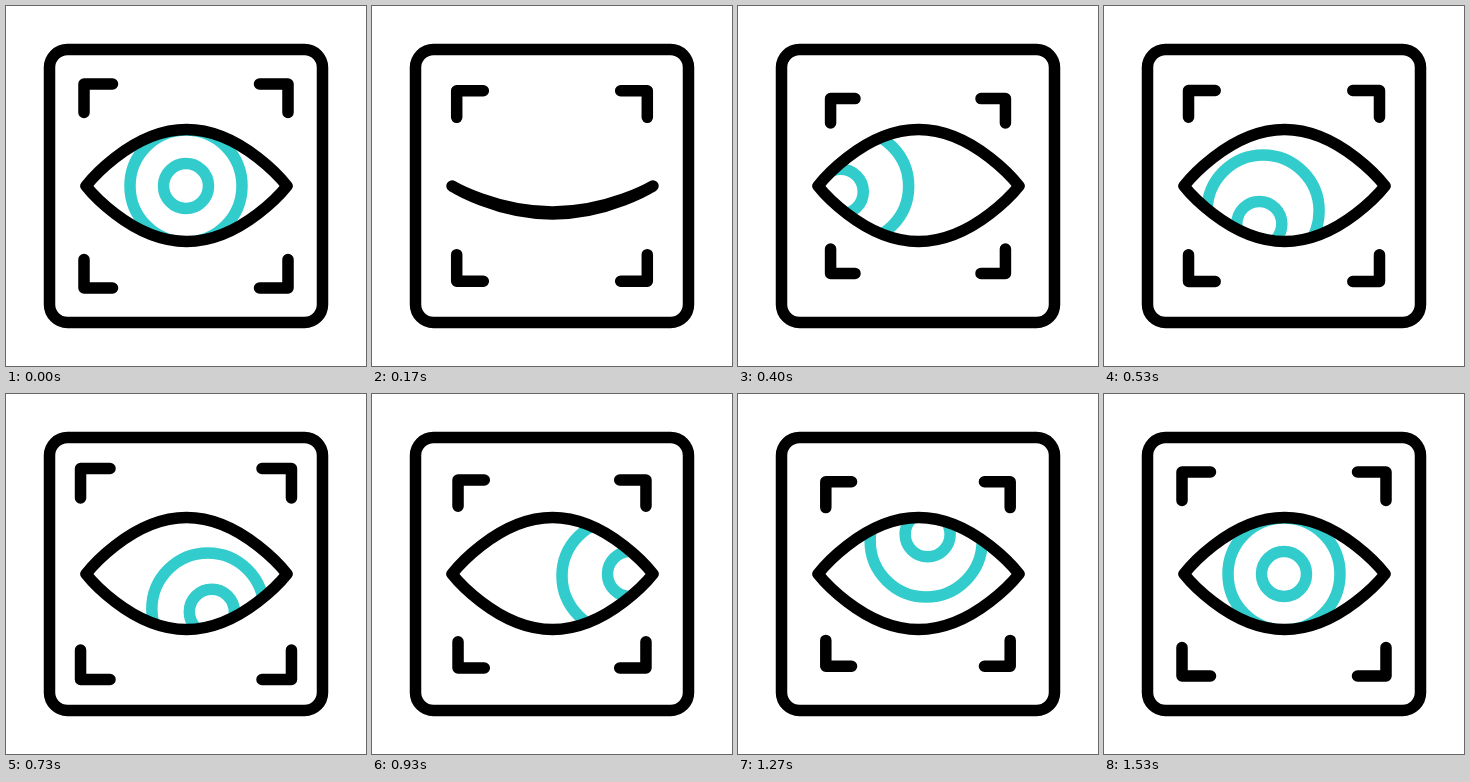
An HTML page for the animation above (1670 ms loop, 360x360 px).

```html
<!DOCTYPE html>
<html lang="en">
<head>
<meta charset="utf-8">
<title>Eye scan</title>
<style>
  html, body { margin: 0; width: 100%; height: 100%; overflow: hidden; background: #fff; }
  svg { display: block; width: 100%; height: 100%; }
</style>
</head>
<body>
<svg viewBox="0 0 360 360" fill="none" stroke="#000" stroke-width="11.5" stroke-linecap="round" stroke-linejoin="round">
  <clipPath id="opening"><path class="lids"/></clipPath>
  <rect x="43.5" y="43.5" width="273" height="273" rx="18"/>
  <path id="brackets" vector-effect="non-scaling-stroke"
    d="M-102-73.5V-102H-73.5M73.5-102H102V-73.5M102 73.5V102H73.5M-73.5 102H-102V73.5"/>
  <g clip-path="url(#opening)" stroke="#33cccc">
    <circle id="iris" r="56"/>
    <circle id="pupil" r="22.5"/>
  </g>
  <path class="lids"/>
</svg>
<script>
const LOOP = 1670, END = 1530, BLINK = 315;
const LEFT = 330, BOTTOM = 630, RIGHT = 930, TOP = 1370; // times the gaze gets there
const IRIS_LAG = 50;

const gazeAngle = [[LEFT, Math.PI], [BOTTOM, Math.PI / 2], [RIGHT, 0], [TOP, -Math.PI / 2]];
const bracketScale = [[0, 1], [360, .855], [720, 1.034], [1090, .855], [END, 1]];

const byId = id => document.getElementById(id);
const lids = document.querySelectorAll('.lids');
const clamp = u => Math.min(1, Math.max(0, u));
const ease = u => u ** 3 * (6 * u * u - 15 * u + 10);

// Eases through [time, value] keys and holds before the first and after the last
function tween(keys, t) {
  return keys.slice(1).reduce((value, [time, next], i) => {
    const [from, previous] = keys[i];
    return value + (next - previous) * ease(clamp((t - from) / (time - from)));
  }, keys[0][1]);
}

function place(id, x, y, scale = 1) {
  byId(id).setAttribute('transform', `translate(${180 + x} ${180 + y}) scale(${scale})`);
}

function draw(now) {
  const t = now % LOOP;

  // The gaze leaves the centre, goes half-way round an ellipse and on to the top, then returns
  const reach = clamp(t / LEFT) ** 2 * clamp((END - t) / (END - TOP)) ** 2;
  const angle = tween(gazeAngle, t), lagging = tween(gazeAngle, t - IRIS_LAG);
  place('pupil', 78 * reach * Math.cos(angle), 40 * reach * Math.sin(angle));
  place('iris', 66 * reach * Math.cos(angle), 35 * reach * Math.sin(lagging));
  place('brackets', 0, 0, tween(bracketScale, t));

  const closed = t < BLINK ? Math.sin(Math.PI * t / BLINK) ** 2 : 0;
  const top = 123.5 + 84 * closed, bottom = 235.5 - 28 * closed;
  const d = `M80 180C80 180 124 ${top} 180.5 ${top}S281 180 281 180`
    + `S237 ${bottom} 180.5 ${bottom}S80 180 80 180Z`;
  lids.forEach(lid => lid.setAttribute('d', d));
  requestAnimationFrame(() => draw(performance.now() - start));
}

const start = performance.now();
draw(0);
</script>
</body>
</html>
```
